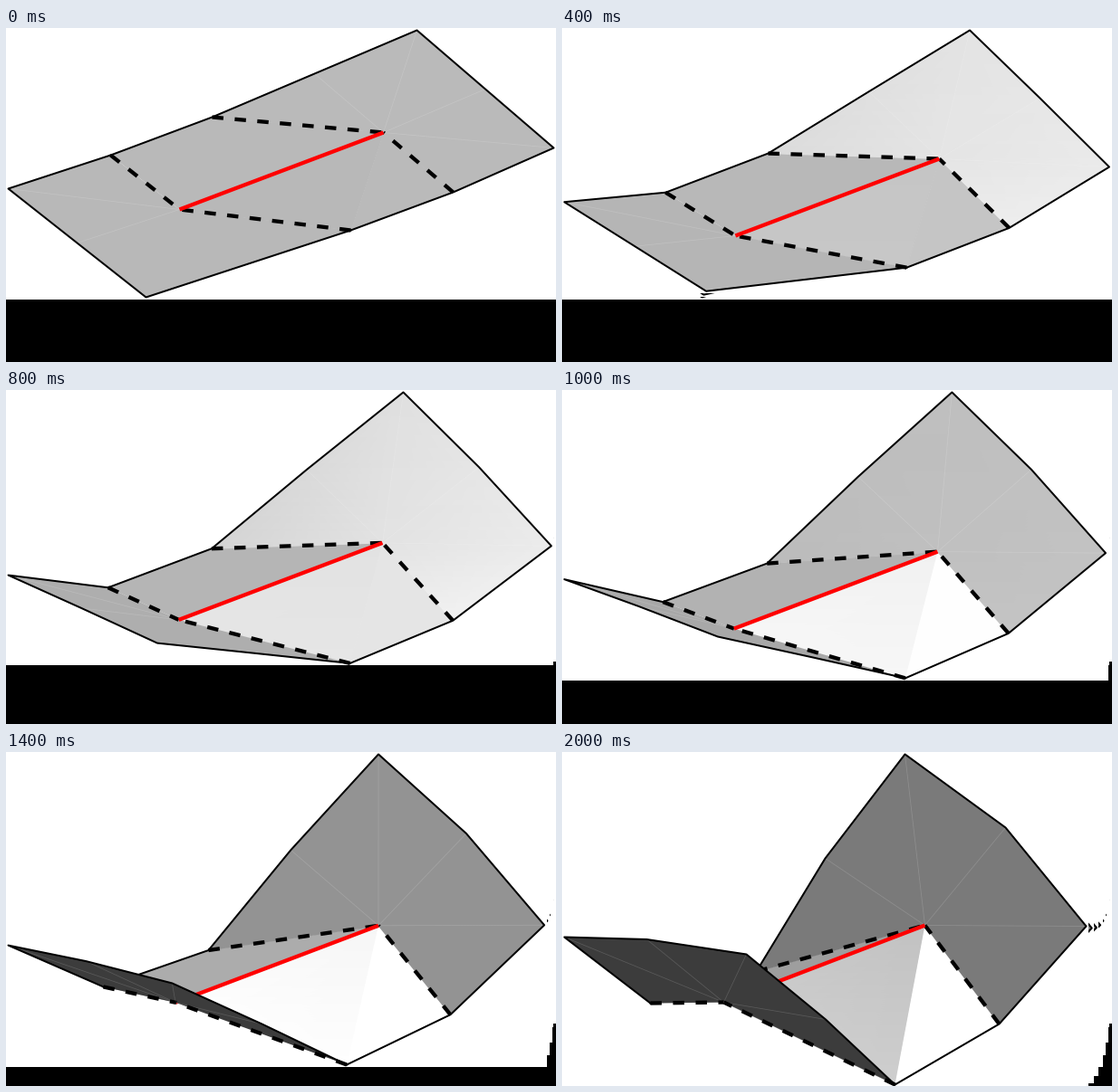
These frames come from a looping animation (607 by 369 pixels, 2.2 s). A matplotlib script:

```python
import numpy as np
import matplotlib.pyplot as plt
from matplotlib.animation import ArtistAnimation
from matplotlib.patches import Rectangle

W, H, DPI = 607, 369, 72
STEPS, INTERVAL = 11, 200
FLIP = 6      # from this step on the left flap shows its dark back
MARGIN = 2    # gap kept at the top and left of the sheet

# Shading of the faces whose light rises and falls
TONE_STEPS = [0, 2, 4, 5, 7, 10]
RIGHT = [186, 220, 212, 188, 147, 122]
RIGHT_SPREAD = [0, 18, 30, 8, 0, 0]
LOWER = [184, 199, 230, 247, 254, 206]

fig = plt.figure(figsize=((W + 0.01) / DPI, (H + 0.01) / DPI), dpi=DPI,
                 facecolor="black")
ax = fig.add_axes([0, 0, 1, 1])
ax.set_xlim(-0.5, W - 0.5)
ax.set_ylim(H - 0.5, -0.5)
ax.axis("off")


def tone(levels, t):
    return np.interp(t, TONE_STEPS, levels)


def grey(level):
    return min(level, 255) / 255


def corners(t):
    """Sheet corners; E and F are the ends of the ridge."""
    q, u = t ** 2, t ** 3
    vec = lambda x, y: np.array([x, y], float)
    E = vec(0, 0)
    F = vec(-225 + 0.003 * u, 85)
    p = {
        "E": E,
        "F": F,
        "A": E + vec(37 + 0.7 * t - 1.31 * q + 0.065 * u,
                     -113 - 15.3 * t + 0.3 * q + 0.047 * u),
        "B": E + vec(188 - 0.1 * q, 17 - 4.6 * t + 0.3 * q),
        "P": E + vec(77 + 0.05 * q, 66 + 5.4 * t - 0.11 * q),
        "S": E + vec(-189 + 0.03 * q, -17 + 5.2 * t + 0.16 * q),
        "R": F + vec(-76 - 0.5 * t, -60 + 6.1 * t),
        "Q": F + vec(189, 23 + 5.9 * t + 0.09 * q),
        "D": F + vec(-189 + 0.013 * u, -23 - 7.7 * t + 0.28 * q),
        "C": F + vec(-37 + 1.4 * t + 0.48 * q,
                     97 - 17.5 * t - 0.3 * q + 0.055 * u),
    }
    # Edge midpoints drift outward as the flaps bend
    p["s"] = (p["S"] + p["A"]) / 2 + q * vec(-0.06, -0.05)
    p["a"] = (p["A"] + p["B"]) / 2 + q * vec(0.11, -0.14)
    p["c"] = (p["C"] + p["D"]) / 2 + q * vec(-0.095, -0.07)
    p["m"] = (p["Q"] + p["C"]) / 2 + q * vec(0.055, 0)
    shift = MARGIN - np.min(list(p.values()), axis=0)
    return {k: v + shift for k, v in p.items()}


def layer(t):
    p = corners(t)
    # Only the sheet's own box is repainted; outside it older steps remain
    w, h = np.round(np.max(list(p.values()), axis=0)) + MARGIN + 1
    area = ax.add_patch(Rectangle((-0.5, -0.5), w, h,
                                  fc="white", ec="none", zorder=t))
    parts = [area]

    def keep(artist):
        artist.set_zorder(t)
        artist.set_clip_path(area)
        parts.append(artist)

    def path(names):
        return np.array([p[k] for k in names]).T

    def line(names, width, color="black", **style):
        keep(ax.plot(*path(names), color=color, lw=width,
                     solid_joinstyle="round", **style)[0])

    def face(names, level):
        keep(ax.fill(*path(names), fc=str(grey(level)), ec="none")[0])

    def fan(names, levels):
        tris = [(0, i, i + 1) for i in range(1, len(names) - 1)]
        keep(ax.tripcolor(*path(names), tris, np.array(levels),
                          shading="gouraud", cmap="gray", vmin=0, vmax=255))

    def dashes(*folds):
        for fold in folds:
            line(fold, 4.3, ls=(0, (12.5 / 4.3, 12.5 / 4.3)),
                 dash_capstyle="butt")

    def creases(hub, ends):
        for end in ends:
            line(hub + end, 0.8, "white", alpha=0.15)

    def sheet():
        face("RSEF", 185 - 0.27 * t ** 2)
        low = tone(LOWER, t)
        fan("FEQ", [low, low - 1.2 * t, low])
        face("EPQ", 186 + 2.7 * t ** 2)
        near, spread = tone(RIGHT, t), tone(RIGHT_SPREAD, t)
        fan("ESsAaBP", near + spread * np.array([0.5, *np.linspace(0, 1, 6)]))
        creases("E", "sAaB")
        line("RSsAaBPQ", 2)
        dashes("SE", "PE")

    def left_flap():
        face("DRFQmCc", 60 if t >= FLIP else 184 - 0.64 * t ** 2)
        creases("F", "DcCm" if t >= FLIP else "Dc")
        line("QmCcDR", 2)
        dashes("RF", "QF")

    def ridge():
        line("FE", 4.3, "red", solid_capstyle="butt")

    sheet()
    for draw in (ridge, left_flap) if t >= FLIP else (left_flap, ridge):
        draw()
    return parts


layers = [layer(t) for t in range(STEPS)]
frames = [sum(layers[:n + 1], []) for n in range(STEPS)]
anim = ArtistAnimation(fig, frames, interval=INTERVAL, repeat=True,
                       repeat_delay=0, blit=False)
plt.show()
```
